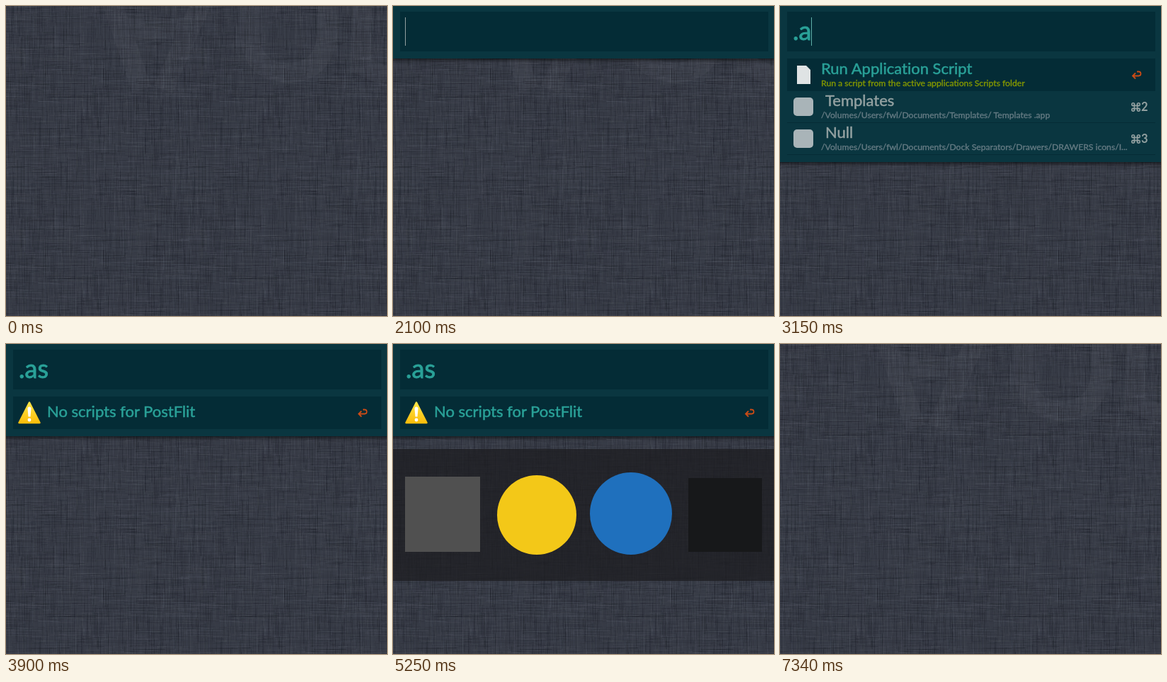
Animation, 538 px wide and 437 px high, one loop 8 s. Source, as an HTML page with a canvas:

```html
<!DOCTYPE html>
<html lang="en">
<head>
<meta charset="utf-8">
<title>Launcher</title>
<style>
  html, body { margin: 0; width: 100%; height: 100%; overflow: hidden; background: #373b46; }
  canvas, svg { position: absolute; left: 0; top: 0; display: block; }
  text { font-family: Lato, "Open Sans", sans-serif; font-variant-ligatures: none; white-space: pre; }
  .title { font-size: 22px; fill: #93a1a1; stroke: #93a1a1; stroke-width: .5px; }
  .sub { font-size: 12.2px; fill: #657b83; stroke: #657b83; stroke-width: .35px; }
  .on .title { fill: #2aa198; stroke: #2aa198; }
  .on .sub { fill: #859900; stroke: #859900; }
  .key { font-size: 16.5px; font-weight: 700; fill: #93a1a1; }
  .query { font-size: 36px; fill: #2aa198; stroke: #2aa198; stroke-width: .9px; }
  .label { font: 700 14px "Noto Sans", sans-serif; fill: #fff; text-anchor: middle; }
</style>
</head>
<body>
<canvas id="linen" width="538" height="437"></canvas>
<svg id="stage" width="538" height="437" viewBox="0 0 538 437">
  <defs>
    <linearGradient id="shade" x2="0" y2="1">
      <stop stop-color="#000" stop-opacity=".5"/>
      <stop offset="1" stop-color="#000" stop-opacity="0"/>
    </linearGradient>
    <linearGradient id="amber" x2="0" y2="1">
      <stop stop-color="#ffe545"/>
      <stop offset="1" stop-color="#fbbd0c"/>
    </linearGradient>
  </defs>
  <g id="panel">
    <rect id="back" width="538" fill="#0a3640"/>
    <rect id="shadow" width="538" height="6" fill="url(#shade)"/>
    <rect x="10" y="8" width="520" height="56" fill="#042c36"/>
    <text id="query" class="query" x="18" y="48"></text>
    <rect id="caret" y="16" width="1" height="40"/>
    <g id="rows"></g>
  </g>
  <g id="switcher">
    <rect y="148" width="538" height="186" fill="#1d1d22" fill-opacity=".76"/>
    <g id="pick">
      <rect x="1.5" y="173.5" width="133" height="133" rx="7" fill="#0f1015" stroke="#ececee" stroke-width="3"/>
      <g id="tag">
        <rect y="312" width="136" height="18" rx="9" fill="#0f1015"/>
        <text id="name" class="label" x="68" y="326"></text>
      </g>
    </g>
    <rect x="17" y="187" width="106" height="106" fill="#505050"/>
    <circle cx="203" cy="241" r="56" fill="#f3c818"/>
    <circle cx="336" cy="239" r="58" fill="#1f70bd"/>
    <rect x="417" y="189" width="104" height="104" fill="#17181a"/>
  </g>
</svg>
<script>
const $ = id => document.getElementById(id);
const set = (el, attrs) => { for (const k in attrs) el.setAttribute(k, attrs[k]); };
const show = (el, on) => { el.style.display = on ? '' : 'none'; };

// Woven cloth on a repeating 256 px tile
function paintLinen() {
  let seed = 11;
  const rnd = () => (seed = seed * 16807 % 2147483647) / 2147483647;
  const size = 256, tile = document.createElement('canvas');
  tile.width = tile.height = size;
  const c = tile.getContext('2d');
  c.fillStyle = '#373b46';
  c.fillRect(0, 0, size, size);
  for (let i = 0; i < 4200; i++) {
    const x = Math.floor(rnd() * size), y = Math.floor(rnd() * size);
    const len = 8 + rnd() * 45, across = rnd() < .5;
    c.fillStyle = rnd() < .5 ? `rgba(150,155,168,${rnd() * .065})` : `rgba(6,8,14,${rnd() * .13})`;
    for (const wrap of [0, size]) {
      if (across) c.fillRect(x - wrap, y, len, 1);
      else c.fillRect(x, y - wrap, 1, len);
    }
  }
  const g = $('linen').getContext('2d');
  g.fillStyle = g.createPattern(tile, 'repeat');
  g.fillRect(0, 0, 538, 437);
  g.strokeStyle = 'rgba(200,205,205,.03)';
  g.lineWidth = 28;
  g.stroke(new Path2D('M148-10L192 118M278-10L222 118M165 32H262M344-10V36Q346 94 398 94T454 36V-10M502-10V84L538 100'));
}

const docs = '/Volumes/Users/fwl/Documents/';
const script = ['Run Application Script', 'Run a script from the active applications Scripts folder', 'doc'];
const drawer = [' Null', docs + 'Dock Separators/Drawers/DRAWERS icons/I...', 'app'];
const templates = [' Templates', docs + 'Templates/ Templates .app', 'app'];
const lists = {
  empty: [],
  all: [
    script,
    ['Recently Changed Files', 'Show recently changed files', 'folder'],
    ['Recent item(s)', '', 'doc'],
    ['Manage File/Folder Tags', 'Show, Add, Remove Tags', 'folder'],
    ['http://media.fernwillows.de', 'Open the URL from history', 'globe'],
    drawer, templates,
    ['Disk Space', 'Show available space on all mounted drives', 'disk']
  ],
  few: [script, templates, drawer],
  wait: [['Run Application Script', 'Please wait...', 'doc']],
  none: [['No scripts for PostFlit', '', 'warn']]
};
const icons = {
  doc: '<path d="M-9-13H4L10-7V13H-9Z" fill="#dfe3e4"/>',
  folder: '<path d="M-15-10H-4L-1-7H15V11H-15Z" fill="#6fa9d2"/>',
  app: '<rect x="-14" y="-13" width="28" height="26" rx="5" fill="#a9b4b8"/>',
  globe: '<circle r="13" fill="#4f8fc4"/>',
  disk: '<rect x="-14" y="-10" width="28" height="20" rx="3" fill="#b5babd"/>',
  warn: '<path d="M0-14.500L14.500 14H-14.500Z" fill="url(#amber)" stroke="url(#amber)" stroke-width="2.5" stroke-linejoin="round"/>' +
    '<path d="M-2.500-6a2.500 2.500 0 0 1 5 0L1.500 5.500H-1.500Z" fill="#fff"/><circle cy="10" r="2.400" fill="#fff"/>'
};
const enter = '<path d="M502-2.500L498 1.500L502 5.500M498 1.500H506.500a3 3 0 0 0 0-6H504" fill="none" stroke="#cb4b16" stroke-width="1.8"/>';
const loops = [[-1, -1], [1, -1], [-1, 1], [1, 1]]
  .map(([x, y]) => `<circle cx="${x * 3.8}" cy="${y * 3.8}" r="1.9"/>`).join('');
const shortcut = n => `<g transform="translate(502.500 .5)" fill="none" stroke="#93a1a1" stroke-width="1.6">
  <path d="M-2-4V4M2-4V4M-4-2H4M-4 2H4"/>${loops}</g><text class="key" x="510" y="6">${n}</text>`;

function row([title, sub, icon], i, withIcon) {
  const x = title[0] === ' ' ? 64 : 58;
  return `<g class="${i ? '' : 'on'}" transform="translate(0 ${97 + 45 * i})">
    ${i ? '<path d="M10 22.500H530" stroke="#062c36"/>' : '<rect x="10" y="-23" width="520" height="46" fill="#042c36"/>'}
    ${withIcon ? `<g transform="translate(33 0)">${icons[icon]}</g>` : ''}
    <text class="title" x="${x}" y="${sub ? -1 : 6}">${title.trim()}</text>
    <text class="sub" x="58" y="16">${sub}</text>
    ${i ? shortcut(i + 1) : enter}</g>`;
}

// start, query, list, panel height, icons shown
const steps = [
  [1050, '', 'empty', 74, false],
  [2700, '.', 'all', 437, false],
  [2850, '.', 'all', 437, true],
  [3150, '.a', 'few', 220, true],
  [3450, '.as', 'wait', 130, true],
  [3600, '.as', 'none', 130, false],
  [3750, '.as', 'none', 130, true]
];
const caretX = [17, 26, 44, 60];
const caretOff = [[1500, 2100], [3900, 4500], [5100, 5700], [6150, 6740]];
const picks = [[6000, -1], [6290, 0], [6740, 1], [7190, null]];
const names = ['Meadow Text', 'Quartz Meadow'];
const at = (list, t) => list.filter(s => t >= s[0]).pop();
let current;

function drawPanel(step) {
  if (step === current) return;
  current = step;
  const [, query, list, height, withIcons] = step;
  set($('back'), { height });
  set($('shadow'), { y: height });
  $('query').textContent = query;
  set($('caret'), { x: caretX[query.length], fill: query ? '#5fb0aa' : '#93a1a1' });
  $('rows').innerHTML = lists[list].map((r, i) => row(r, i, withIcons)).join('') +
    (list === 'all' ? '<rect x="527.500" y="74" width="2.500" height="183" rx="1" fill="#5f767b"/>' : '');
}

function render(t) {
  const step = at(steps, t), open = step && t < 7190;
  show($('panel'), open);
  if (open) {
    drawPanel(step);
    show($('caret'), !caretOff.some(([a, b]) => t >= a && t < b));
  }
  show($('switcher'), t >= 5250 && t < 7340);
  const pick = at(picks, t), chosen = pick && pick[1] !== null;
  show($('pick'), chosen);
  if (chosen) {
    const k = pick[1];
    set($('pick'), { transform: `translate(${2 + 133 * k} 0)` });
    show($('tag'), k >= 0);
    $('name').textContent = names[k] || '';
  }
}

paintLinen();
const start = performance.now();
function tick() {
  render((performance.now() - start) % 8000);
  requestAnimationFrame(tick);
}
tick();
</script>
</body>
</html>
```
